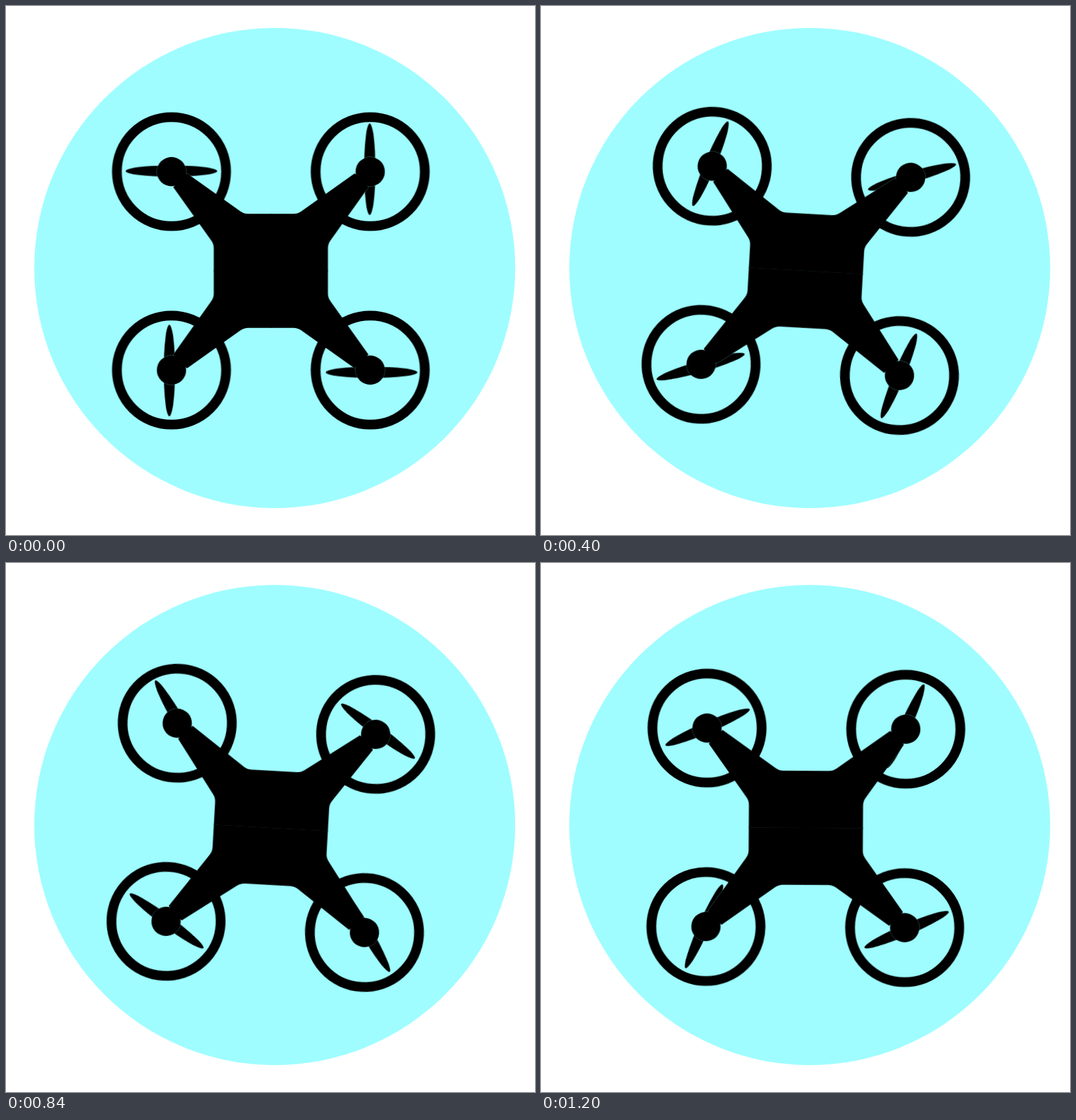
Animation, 748 px wide and 749 px high, one loop 1.24 s. Source, as an HTML page:

```html
<!DOCTYPE html>
<html lang="en">
<head>
<meta charset="utf-8">
<title>Drone</title>
<style>
  html, body { margin: 0; width: 100%; height: 100%; overflow: hidden; background: #fff; }
  svg { display: block; width: 748px; height: 749px; }

  .drone { animation: tilt 1240ms infinite; }
  .prop { animation: spin 1240ms infinite; }
  .seam { fill: none; stroke: #9ffdff; stroke-opacity: .4; }
  .rings { fill: none; stroke: #000; stroke-width: 13.8; }

  /* Every segment advances in 40 ms ticks. */
  @keyframes tilt {
    0% { transform: rotate(0deg); animation-timing-function: steps(16); }
    51.6119% { transform: rotate(5.161deg); animation-timing-function: steps(1); }
    51.612% { transform: rotate(4.839deg); animation-timing-function: steps(15); }
    100% { transform: rotate(0deg); }
  }
  @keyframes spin {
    0% { transform: rotate(0deg); animation-timing-function: steps(5); }
    16.129% { transform: rotate(52.3deg); animation-timing-function: steps(5); }
    32.258% { transform: rotate(109.3deg); animation-timing-function: steps(4); }
    45.161% { transform: rotate(155.7deg); animation-timing-function: steps(7); }
    67.741% { transform: rotate(236.7deg); animation-timing-function: steps(5); }
    83.87% { transform: rotate(293.8deg); animation-timing-function: steps(4); }
    96.774% { transform: rotate(336.5deg); animation-timing-function: steps(1); }
    100% { transform: rotate(360deg); }
  }
</style>
</head>
<body>
<svg viewBox="0 0 748 749">
  <defs>
    <ellipse id="blade" cx=".4" cy="2.2" rx="64.8" ry="8"/>
    <g id="arm">
      <path d="M-80.7 .5V-32Q-80.7-38-84.3-43L-138-118.5L-118.5-138L-43-84.3Q-38-80.7-32-80.7H.5V.5Z"/>
      <circle cx="-140.5" cy="-140.5" r="20.7"/>
    </g>
    <g id="frame">
      <use href="#arm"/>
      <use href="#arm" transform="rotate(90)"/>
      <use href="#arm" transform="rotate(180)"/>
      <use href="#arm" transform="rotate(270)"/>
    </g>
  </defs>

  <circle cx="380" cy="371" r="340" fill="#9ffdff"/>

  <g transform="translate(374.5 375)">
    <g class="drone">
      <g transform="translate(-141 -143.5)">
        <g class="prop"><use href="#blade"/></g>
      </g>
      <g transform="translate(142 141.5)">
        <g class="prop"><use href="#blade"/></g>
      </g>
      <!-- Mirrored, so these two turn the other way -->
      <g transform="translate(142 -143.5) scale(-1 1)">
        <g class="prop"><use href="#blade" transform="rotate(-90)"/></g>
      </g>
      <g transform="translate(-141.3 141.5) scale(-1 1)">
        <g class="prop"><use href="#blade" transform="rotate(-90)"/></g>
      </g>

      <use class="seam" href="#frame"/>
      <use href="#frame"/>

      <g class="rings">
        <circle cx="-140.5" cy="-140.5" r="77.2"/>
        <circle cx="140.5" cy="-140.5" r="77.2"/>
        <circle cx="-140.5" cy="140.5" r="77.2"/>
        <circle cx="140.5" cy="140.5" r="77.2"/>
      </g>
    </g>
  </g>
</svg>
</body>
</html>
```
